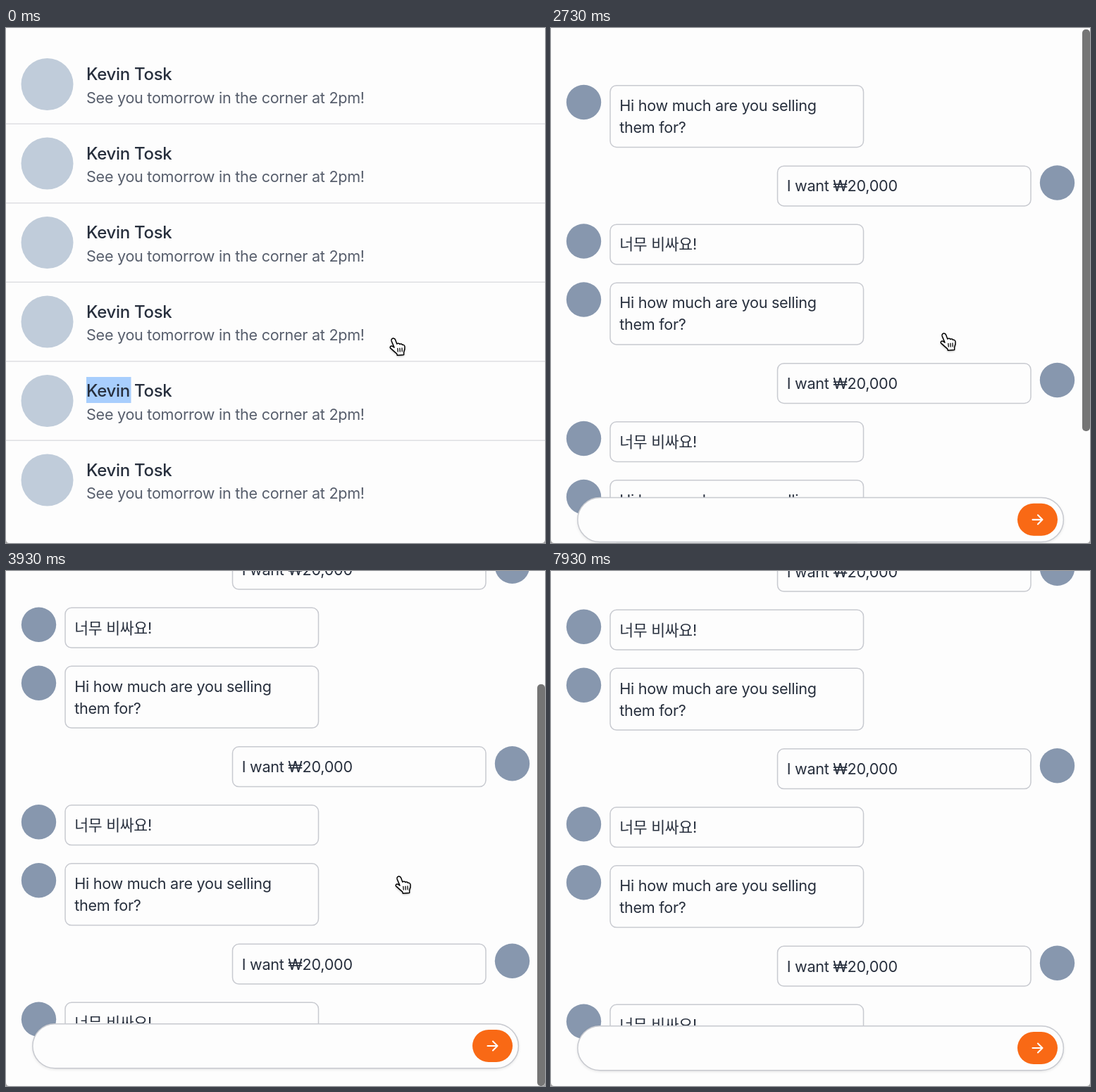
Recreate the animation shown at these times as an HTML page with a canvas. Size 765 by 732 pixels, loop 7960 ms.

```html
<!DOCTYPE html>
<html lang="en">
<head>
<meta charset="utf-8">
<title>Chat list</title>
<style>
  html, body { margin: 0; width: 100%; height: 100%; overflow: hidden; background: #fdfdfd; }
  canvas { display: block; width: 765px; height: 732px; }
</style>
</head>
<body>
<canvas id="stage" width="765" height="732"></canvas>
<script>
const W = 765, H = 732, LOOP = 7960;
const ctx = document.getElementById('stage').getContext('2d');

const PAPER = '#fdfdfd', INK = '#272f3d', BORDER = '#c8cad0', ORANGE = '#f96915', DARK_ORANGE = '#e64c08';
const FONTS = 'Inter, "Noto Sans CJK KR", "Noto Sans CJK", sans-serif';
const BODY = 21.6, TITLE = 24;

const OPEN_CHAT = 1630;
const MAX_SCROLL = 203, THUMB = 571;
const CYCLE = 280.5;
const MESSAGES = [
  { y: 60, h: 89, lines: ['Hi how much are you selling', 'them for?'] },
  { y: 174.5, h: 58, mine: true, lines: ['I want ₩20,000'] },
  { y: 257.5, h: 58, lines: ['너무 비싸요!'] }
];

// Tracks: [time, value, ...]; negative scroll is the rubber band at the top.
const SCROLL = [[2220, 0], [2370, -30], [2520, -42], [2940, 0], [3170, 58.5], [3480, 180], [3640, 212], [3760, 214], [3930, 206], [4250, 203]];
const CURSOR_X = [[20, 544], [170, 552], [4630, 552], [5360, 671], [6230, 671], [6700, 634]];
const CURSOR_Y = [[20, 440], [170, 433], [4630, 433], [5360, 686], [6230, 686], [6700, 433]];
const SWIPE = [[950, 0], [1430, 64], [1600, 72]];

const clamp = (v, lo = 0, hi = 1) => Math.min(hi, Math.max(lo, v));
const between = (t, from, to) => t >= from && t < to;

function track(keys, t) {
  const next = keys.findIndex(k => t < k[0]);
  if (next === 0) return keys[0][1];
  if (next < 0) return keys[keys.length - 1][1];
  const [t0, a] = keys[next - 1], [t1, b] = keys[next];
  const p = (t - t0) / (t1 - t0);
  return a + (b - a) * p * p * (3 - 2 * p);
}

function circle(x, y, r, color) {
  ctx.beginPath();
  ctx.arc(x, y, r, 0, Math.PI * 2);
  ctx.fillStyle = color;
  ctx.fill();
}

function box(x, y, w, h, r, fill, stroke, line = 1.5) {
  ctx.beginPath();
  ctx.roundRect(x, y, w, h, r);
  if (fill) { ctx.fillStyle = fill; ctx.fill(); }
  if (stroke) { ctx.strokeStyle = stroke; ctx.lineWidth = line; ctx.stroke(); }
}

function text(str, x, y, size, color, weight = 400) {
  ctx.font = `${weight} ${size}px ${FONTS}`;
  ctx.letterSpacing = `${-0.013 * size}px`;
  ctx.fillStyle = color;
  ctx.fillText(str, x, y);
}

function strokePath(path, color, width) {
  ctx.strokeStyle = color;
  ctx.lineWidth = width;
  ctx.lineCap = ctx.lineJoin = 'round';
  ctx.stroke(path);
}

function drawList(t) {
  for (let i = 0; i < 6; i++) {
    const y = i * 112.5;
    circle(58.5, y + 80, 37, '#c0ccda');
    if (i === 4 && t < 60) {
      ctx.fillStyle = '#a8cefd';
      ctx.fillRect(114, 496, 63.5, 37);
    }
    text('Kevin Tosk', 114, y + 74, TITLE, INK, 500);
    text('See you tomorrow in the corner at 2pm!', 114, y + 106.5, BODY, '#575e6c');
    if (i < 5) {
      ctx.fillStyle = 'rgba(20,30,50,0.13)';
      ctx.fillRect(0, y + 135.5, W, 1.5);
    }
  }
}

const swipeArrow = new Path2D('M728 366H784 M757 342L784 366L757 390');

// The arrow is a hole in the disc, so this goes under the page content.
function drawSwipe(t) {
  const shift = track(SWIPE, t);
  if (shift <= 0 || t > 1730) return;
  ctx.save();
  ctx.globalAlpha = 1 - clamp((t - OPEN_CHAT) / 100);
  ctx.translate(64 - shift, 0);
  circle(809.5, 366, 108.5, 'rgba(0,0,0,0.072)');
  strokePath(swipeArrow, PAPER, 14);
  ctx.restore();
}

function drawMessage({ y, h, mine, lines }, offset) {
  const top = y + offset;
  if (top > H || top + h < -2) return;
  const x = mine ? 321.5 : 84;
  circle(mine ? 718.5 : 46.5, top + 24.7, 24.7, '#8797ae');
  box(x, top + 0.8, 359.5, h - 1.2, 9, null, BORDER);
  lines.forEach((line, i) => text(line, x + 13.2, top + 37 + i * 31, BODY, INK));
}

const sendArrow = new Path2D('M683.5 678H697.5 M691 671.5L697.5 678L691 684.5');

function drawInput(t, shift) {
  ctx.save();
  ctx.translate(0, shift);
  ctx.save();
  ctx.shadowColor = 'rgba(0,0,0,0.12)';
  ctx.shadowBlur = 4;
  ctx.shadowOffsetY = 1.5;
  box(37.8, 646.7, 689.6, 63, 31.5, PAPER);
  ctx.restore();
  box(37.8, 646.7, 689.6, 63, 31.5, PAPER, BORDER);
  if (between(t, 5460, 6300)) {
    box(656, 649, 69, 58, 29, ORANGE);
    box(659, 652, 63, 52, 26, PAPER);
  }
  box(662, 655, 57, 46, 23, between(t, 5260, 6280) ? DARK_ORANGE : ORANGE);
  strokePath(sendArrow, '#fff', 2.1);
  ctx.restore();
}

function drawScrollbar(t, scroll) {
  if (!between(t, 2230, 4560)) return;
  ctx.globalAlpha = 1 - clamp((t - 4360) / 200);
  const top = 2 + clamp(scroll / MAX_SCROLL) * 159;
  box(754, top, 11, THUMB, 5, '#757575');
  ctx.globalAlpha = 1;
}

function drawChat(t) {
  const scroll = track(SCROLL, t);
  for (let i = 0; i < 3; i++)
    MESSAGES.forEach(m => drawMessage(m, i * CYCLE - scroll));
  drawInput(t, clamp(scroll, 0, MAX_SCROLL) - scroll);
  drawScrollbar(t, scroll);
}

const hand = new Path2D('M3.8 1.8C5.4 .5 7.8 1.1 8.6 3.2L10.8 9C12 7.7 14.2 8 14.8 9.4C16.2 8.5 18 9 18.5 10.4C20.3 9.9 21.8 11 22 13C22.4 16.4 21.6 18.4 20.6 20.8L20.6 24.6L11.4 25.2L10.6 22.8C7.6 20.6 5 17.8 1.7 15.2C.4 13.6 1.8 11.4 4.2 12.2L7 14L3.2 5C2.7 3.7 2.9 2.6 3.8 1.8Z');
const knuckles = new Path2D('M11.8 15.4L12.2 20 M14.9 15.2L15.2 20 M18 15L18.2 19.8');

function drawCursor(t) {
  if (t >= 6715) return;
  ctx.save();
  ctx.translate(track(CURSOR_X, t), track(CURSOR_Y, t));
  ctx.save();
  ctx.shadowColor = 'rgba(0,0,0,0.35)';
  ctx.shadowBlur = 3;
  ctx.shadowOffsetY = 1.5;
  ctx.fillStyle = '#fff';
  ctx.fill(hand);
  ctx.restore();
  strokePath(hand, '#000', 1.5);
  strokePath(knuckles, '#000', 1.3);
  ctx.restore();
}

function drawCorners() {
  ctx.fillStyle = '#a3a3a3';
  ctx.beginPath();
  ctx.moveTo(0, H - 5);
  ctx.quadraticCurveTo(0, H, 5, H);
  ctx.lineTo(0, H);
  ctx.moveTo(W, H - 5);
  ctx.quadraticCurveTo(W, H, W - 5, H);
  ctx.lineTo(W, H);
  ctx.fill();
}

function draw(now) {
  const t = now % LOOP;
  ctx.fillStyle = PAPER;
  ctx.fillRect(0, 0, W, H);
  drawSwipe(t);
  if (t < OPEN_CHAT) drawList(t); else drawChat(t);
  drawCursor(t);
  drawCorners();
}

const start = performance.now();
function tick() {
  draw(performance.now() - start);
  requestAnimationFrame(tick);
}
tick();
</script>
</body>
</html>
```
